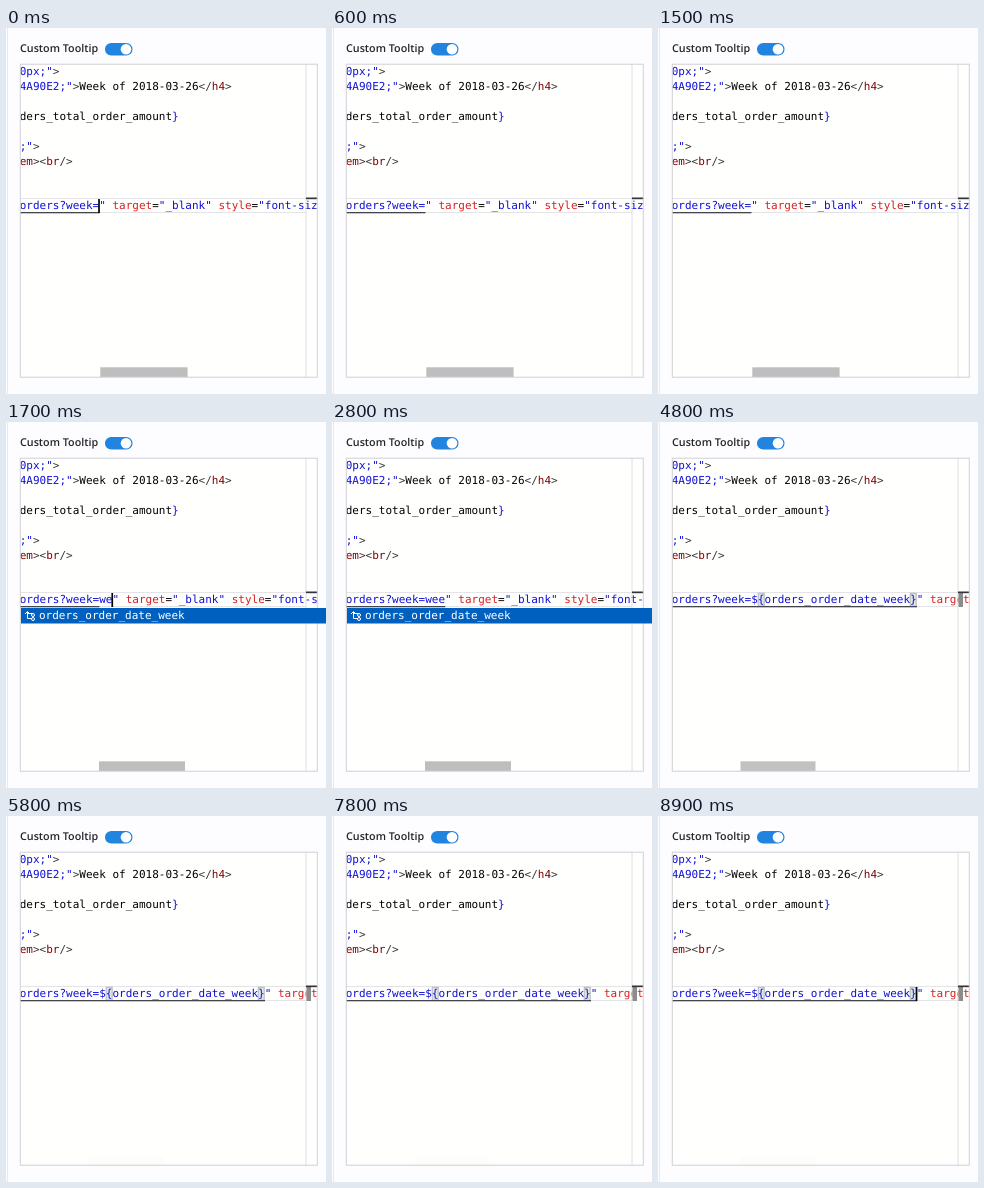
An HTML page for the animation above (9 s loop, 320 by 366 pixels).

```html
<!DOCTYPE html>
<html lang="en">
<head>
<meta charset="utf-8">
<title>Custom Tooltip</title>
<style>
  html, body { margin: 0; width: 100%; height: 100%; overflow: hidden; background: #fdfcfe; }
  svg { display: block; }
  text { white-space: pre; text-rendering: geometricPrecision; }
  .title { font: 600 10.75px "Open Sans", sans-serif; fill: #25252d; }
  .code text { font: 11px "DejaVu Sans Mono", monospace; fill: #000; }
  .code .v { fill: #1010d8; }
  .code .a { fill: #d82020; }
  .code .t { fill: #800000; }
  .code .d { fill: #383838; }
  .code .w { fill: #fff; }
  .bracket { fill: #dfe6e4; stroke: #b5b5bd; }
</style>
</head>
<body>
<svg width="320" height="366" viewBox="0 0 320 366">
  <path d="M1.5 0V366" stroke="#e9e8ee"/>
  <text class="title" x="14" y="24.4">Custom Tooltip</text>
  <rect x="99" y="15" width="27.5" height="12.5" rx="6.25" fill="#2185e0"/>
  <circle cx="120" cy="21.2" r="5.3" fill="#fff"/>

  <clipPath id="view"><rect x="14" y="36" width="297.5" height="313.5"/></clipPath>
  <rect x="14.3" y="36.2" width="297" height="313" fill="#fffffe"/>
  <g class="code" clip-path="url(#view)">
    <path d="M14 170.5H300M14 184.5H300" stroke="#e4e4e8"/>
    <g id="brackets">
      <rect class="bracket" x="100.200" y="171.200" width="6" height="13"/>
      <rect class="bracket" x="252.200" y="171.200" width="6" height="13"/>
    </g>
    <text x="13.7" y="46.7"><tspan class="v">0px;"</tspan><tspan class="d">&gt;</tspan></text>
    <text x="13.7" y="61.7"><tspan class="v">4A90E2;"</tspan><tspan class="d">&gt;</tspan>Week of 2018-03-26<tspan class="d">&lt;/</tspan><tspan class="t">h4</tspan><tspan class="d">&gt;</tspan></text>
    <text x="13.7" y="91.7">ders_total_order_amount<tspan class="v">}</tspan></text>
    <text x="13.7" y="121.6"><tspan class="v">;"</tspan><tspan class="d">&gt;</tspan></text>
    <text x="13.7" y="136.5"><tspan class="t">em</tspan><tspan class="d">&gt;&lt;</tspan><tspan class="t">br</tspan><tspan class="d">/&gt;</tspan></text>
    <rect id="underline" x="14" y="184" height="1.3" fill="#44444c"/>
    <text x="13.7" y="181.3"><tspan class="v">orders?week=<tspan id="typed"></tspan>"</tspan><tspan class="a"> target</tspan>=<tspan class="v">"_blank"</tspan><tspan class="a"> style</tspan>=<tspan class="v">"font-size</tspan></text>
    <rect id="cursor" y="171" width="1.7" height="14" fill="#000"/>
    <rect id="thumb" y="339.3" height="9.7" fill="#bebebe"/>
    <path d="M300 36V349" stroke="#dedee2"/>
    <rect id="mark" x="300.5" y="171" width="4.5" height="14" fill="#8c8c8c"/>
    <rect x="300" y="169.5" width="12" height="1.7" fill="#33333b"/>
  </g>
  <rect x="14.3" y="36.2" width="297" height="313" fill="none" stroke="#d0d0d6"/>

  <g id="popup" class="code">
    <rect x="15" y="186" width="305" height="15.5" fill="#0060bf"/>
    <g fill="none" stroke="#fff">
      <path d="M21.5 190V196.5H25M21.5 191.5H27M19 192L21.5 189.5L24 192"/>
      <circle cx="27" cy="193" r="1.5"/>
      <circle cx="27" cy="197" r="1.5"/>
    </g>
    <text class="w" x="33" y="197">orders_order_date_week</text>
  </g>
</svg>
<script>
const LOOP = 9000, CHAR = 6.622, LEFT = 13.7, PREFIX = 12;
const ACCEPT = 3500;
const el = id => document.getElementById(id);
const set = (id, attrs) => {
  for (const name in attrs) el(id).setAttribute(name, attrs[name]);
};
const show = (id, on) => set(id, { visibility: on ? "visible" : "hidden" });

function typedText(t) {
  if (t >= ACCEPT) return "${orders_order_date_week}";
  return "wee".slice(0, Math.max(0, Math.floor(t / 100) - 15));
}

function cursorOn(t) {
  if (t >= 4000) return t % 1000 >= 900 || t % 1000 < 300;
  return t < 400 || (t >= 1000 && t < 1400) || (t >= 1600 && t < 2500) || t >= 3100;
}

function draw(t) {
  const typed = typedText(t), accepted = t >= ACCEPT;
  if (el("typed").textContent !== typed) el("typed").textContent = typed;
  set("cursor", { x: LEFT - 1 + (PREFIX + typed.length) * CHAR });
  show("cursor", cursorOn(t));
  show("popup", t >= 1700 && !accepted);
  show("brackets", accepted);
  show("mark", accepted);

  // Link detection lags a second behind the typing
  const linked = t < 2800 ? 0 : t < 4600 ? 3 : 25;
  set("underline", { width: (PREFIX + linked) * CHAR });

  const [x, width] = accepted ? [82.5, 75] : typed ? [93, 86] : [94.3, 87.3];
  const fade = Math.min(1, Math.max(0, (t - 4750) / 800));
  set("thumb", { x, width, opacity: 1 - 0.97 * fade });
}

const start = performance.now();
function tick() {
  draw((performance.now() - start) % LOOP);
  requestAnimationFrame(tick);
}
draw(0);
tick();
</script>
</body>
</html>
```
